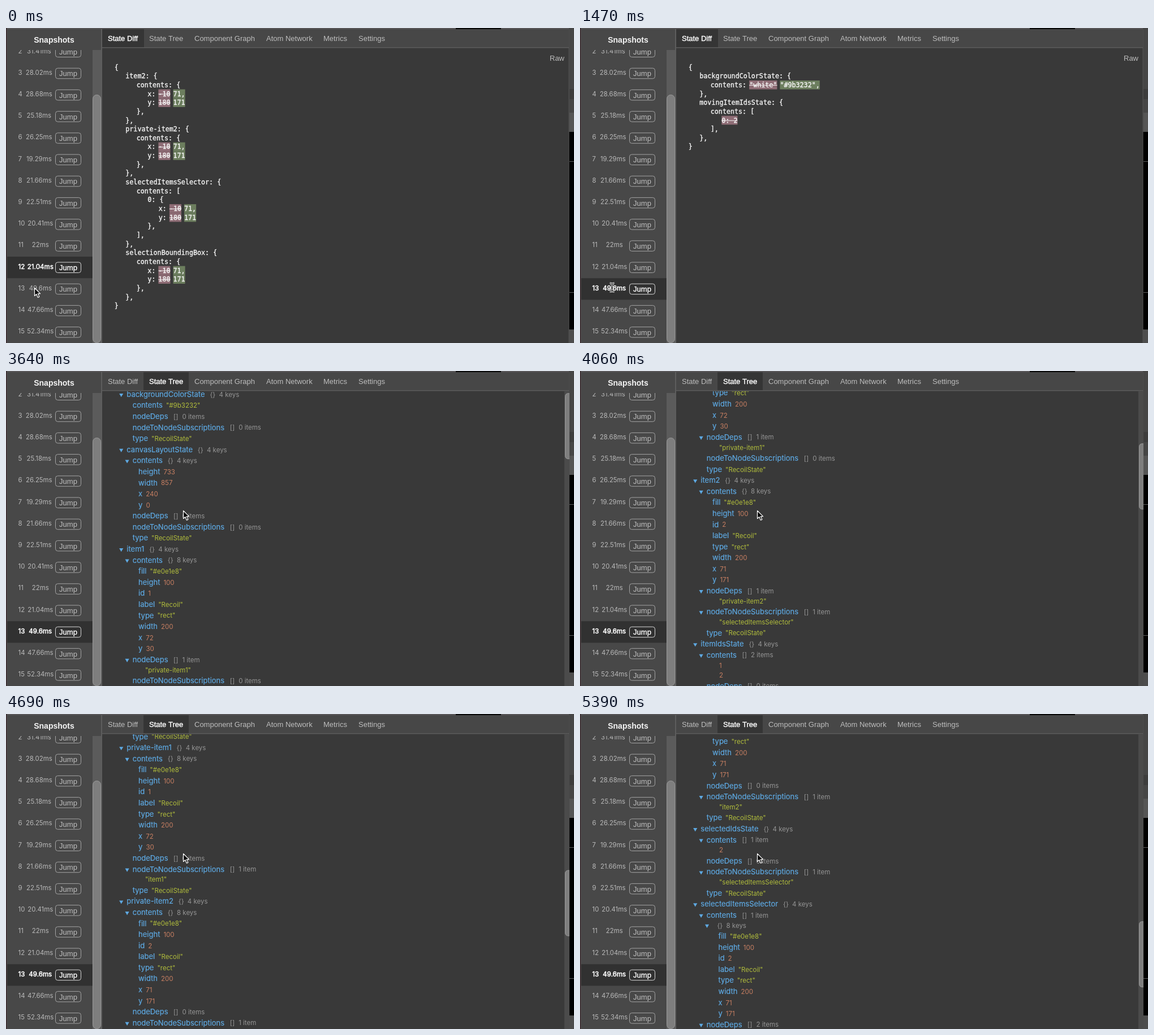
An HTML page with a canvas for the animation above (5460 ms loop, 1004x558 px).

```html
<!DOCTYPE html>
<html lang="en">
<head>
<meta charset="utf-8">
<title>State inspector</title>
<style>
  html, body { margin: 0; width: 100%; height: 100%; overflow: hidden; background: #393939; }
  canvas { display: block; width: 1004px; height: 558px; }
</style>
</head>
<body>
<canvas id="stage"></canvas>
<script>
const W = 1004, H = 558, LOOP = 5460, STEP = 70;
const PICK = 1120, HOVER = 2590, OPEN = 2870;
const SANS = '"Liberation Sans", Arial, sans-serif';
const UI = 'Inter, "Open Sans", sans-serif';
const MONO = '"DejaVu Sans Mono", monospace';
const BLUE = '#5ea9e2', GREEN = '#b1bd3c', ORANGE = '#c77f62', DIM = '#959595';

const canvas = document.getElementById('stage');
const ctx = canvas.getContext('2d');
const ratio = window.devicePixelRatio || 1;
canvas.width = W * ratio;
canvas.height = H * ratio;
ctx.scale(ratio, ratio);

function rect(x, y, w, h, color) {
  ctx.fillStyle = color;
  ctx.fillRect(x, y, w, h);
}

function rounded(x, y, w, h, r, fill, line) {
  ctx.beginPath();
  ctx.roundRect(x, y, w, h, r);
  if (fill) { ctx.fillStyle = fill; ctx.fill(); }
  if (line) { ctx.strokeStyle = line; ctx.lineWidth = 1; ctx.stroke(); }
}

// weight thickens the letters without changing their widths
function text(str, x, y, font, color, { align = 'left', weight = 0 } = {}) {
  ctx.font = font;
  ctx.fillStyle = ctx.strokeStyle = color;
  ctx.textAlign = align;
  ctx.fillText(str, x, y);
  if (weight) {
    ctx.lineWidth = weight;
    ctx.lineJoin = 'round';
    ctx.strokeText(str, x, y);
  }
}

function clipped(x, y, w, h, draw) {
  ctx.save();
  ctx.beginPath();
  ctx.rect(x, y, w, h);
  ctx.clip();
  draw();
  ctx.restore();
}

/* ---------- sidebar ---------- */

const times = ['31.41', '28.02', '28.68', '25.18', '26.25', '19.29', '21.66',
  '22.51', '20.41', '22', '21.04', '49.6', '47.66', '52.34'];

function drawSidebar(active) {
  rect(2, 2, 168, H, '#484848');
  text('Snapshots', 85, 26.3, 'bold 14px ' + SANS, '#f4f4f4', { align: 'center' });
  clipped(2, 39, 166, H - 39, () => {
    times.forEach((time, i) => {
      const n = i + 2, c = 42 + 38.2 * i, on = n === active;
      if (on) rect(2, c - 19, 151, 38.2, '#313131');
      const font = (on ? '500 ' : '') + '11.4px ' + UI;
      const color = on ? '#ffffff' : '#b9b9b9';
      const weight = on ? 0.35 : 0;
      text(n, 21.5, c + 2.6, font, color, { weight });
      text(time + 'ms', n < 10 ? 58.3 : 60.8, c + 2.6, font, color, { align: 'center', weight });
      rounded(87.5, c - 9, 45, 18.5, 4, null, on ? '#d8d8d8' : '#a3a3a3');
      text('Jump', 110, c + 5.2, '13px ' + SANS, on ? '#ffffff' : '#c0c0c0', { align: 'center', weight });
    });
    rect(153, 39, 15, H, '#5b5b5b');
    rounded(153.5, 118.5, 14, 439, 7, '#7e7e7e', '#999999');
  });
  rect(168, 2, 2, H, '#5d5d5d');
}

/* ---------- tabs ---------- */

const tabs = [['State Diff', 180], ['State Tree', 253], ['Component Graph', 333],
  ['Atom Network', 460], ['Metrics', 561], ['Settings', 623]];

function drawTabs(active, dark) {
  rect(170, 2, 825, 33, '#474747');
  rect(dark ? 243 : 170, 2, dark ? 80 : 74, 33, '#353535');
  rect(170, 34, 825, 1.5, '#5c5c5c');
  tabs.forEach(([name, x], i) => {
    const on = i === active;
    text(name, x, 22.5, '13px ' + SANS, on ? '#ffffff' : '#bdbdbd', { weight: on ? 0.4 : 0 });
  });
}

/* ---------- diff view: [depth, text, removed, added] ---------- */

const point = d => [[d, 'x:', '-10', '71,'], [d, 'y:', '180', '171']];
const moved = key => [[1, key + ': {'], [2, 'contents: {'], ...point(3), [2, '},'], [1, '},']];

const moveDiff = [
  [0, '{'], ...moved('item2'), ...moved('private-item2'),
  [1, 'selectedItemsSelector: {'], [2, 'contents: ['], [3, '0: {'], ...point(4),
  [3, '},'], [2, '],'], [1, '},'],
  ...moved('selectionBoundingBox'), [0, '}']
];
const colorDiff = [
  [0, '{'], [1, 'backgroundColorState: {'], [2, 'contents:', '"white"', '"#9b3232",'], [1, '},'],
  [1, 'movingItemIdsState: {'], [2, 'contents: ['], [3, '', '0: 2'], [2, '],'], [1, '},'], [0, '}']
];

function drawDiff(lines) {
  const font = '11.7px ' + MONO, lh = 15.65, weight = 0.35;
  text('Raw', 961, 57.5, '13px ' + SANS, '#bdbdbd');
  lines.forEach(([depth, str, removed, added], i) => {
    let x = 191.8 + 19.5 * depth;
    const y = 73.6 + lh * i, top = y - 11.9;
    text(str, x, y, font, '#f6f6f6', { weight });
    if (str) x += ctx.measureText(str).width + 5;
    if (removed) {
      const w = ctx.measureText(removed).width;
      rect(x, top, w, lh, '#8e6c75');
      text(removed, x, y, font, '#f6f6f6', { weight });
      rect(x, y - 4, w, 1, '#f6f6f6');
      x += w + 5;
    }
    if (added) {
      rect(x, top, ctx.measureText(added).width, lh, '#6c7e5e');
      text(added, x, y, font, '#f6f6f6', { weight });
    }
  });
}

/* ---------- tree view ---------- */

const rows = [];
const add = (depth, key, value) => rows.push({ depth, key, value });
const count = (n, word) => n + ' ' + word + (n === 1 ? '' : 's');
const dict = (depth, key, n) => rows.push({ depth, key, mark: '{}', note: count(n, 'key'), open: true });
const list = (key, items = []) => {
  rows.push({ depth: 1, key, mark: '[]', note: count(items.length, 'item'), open: items.length > 0 });
  items.forEach(value => rows.push({ value, leaf: true }));
};
const links = (deps, subs, last = true) => {
  list('nodeDeps', deps);
  if (!last) return;
  list('nodeToNodeSubscriptions', subs);
  add(1, 'type', '"RecoilState"');
};
const shape = (depth, id) => {
  const item = { fill: '"#e0e1e8"', height: 100, id, label: '"Recoil"', type: '"rect"',
    width: 200, x: id === 1 ? 72 : 71, y: id === 1 ? 30 : 171 };
  for (const key in item) add(depth, key, item[key]);
};
const itemNode = (name, id, deps, subs) => {
  dict(0, name, 4);
  dict(1, 'contents', 8);
  shape(2, id);
  links(deps, subs);
};
const listNode = (name, items, subs) => {
  dict(0, name, 4);
  list('contents', items);
  links([], subs);
};

dict(0, 'backgroundColorState', 4);
add(1, 'contents', '"#9b3232"');
links();
dict(0, 'canvasLayoutState', 4);
dict(1, 'contents', 4);
Object.entries({ height: 733, width: 857, x: 240, y: 0 }).forEach(([k, v]) => add(2, k, v));
links();
itemNode('item1', 1, ['"private-item1"']);
itemNode('item2', 2, ['"private-item2"'], ['"selectedItemsSelector"']);
listNode('itemIdsState', [1, 2]);
listNode('movingItemIdsState', []);
itemNode('private-item1', 1, [], ['"item1"']);
itemNode('private-item2', 2, [], ['"item2"']);
listNode('selectedIdsState', [2], ['"selectedItemsSelector"']);
dict(0, 'selectedItemsSelector', 4);
rows.push({ depth: 1, key: 'contents', mark: '[]', note: '1 item', open: true });
rows.push({ depth: 2, mark: '{}', note: '8 keys', open: true, leaf: true });
shape(3, 2);
links(['"selectedIdsState"', '"item2"'], [], false);

function triangle(x, y) {
  ctx.fillStyle = BLUE;
  ctx.beginPath();
  ctx.moveTo(x - 3.6, y - 2.4);
  ctx.lineTo(x + 3.6, y - 2.4);
  ctx.lineTo(x, y + 3.8);
  ctx.fill();
}

function drawRow(row, y) {
  const small = '11.5px ' + UI;
  let x = 213.3 + 10.4 * (row.depth || 0);
  if (row.open) triangle(x - 9.6, y + 0.7);
  if (row.key) {
    text(row.key, x, y + 4.3, '13px ' + UI, BLUE, { weight: 0.2 });
    x += ctx.measureText(row.key).width;
  }
  if (row.mark) {
    if (!row.key) x = 233.5;
    text(row.mark, x + 13.8, y + 4, small, DIM, { align: 'center' });
    text(row.note, x + 25, y + 4, small, DIM);
  } else {
    text(row.value, row.leaf ? 246 : x + 6, y + 4.2, small,
      typeof row.value === 'number' ? ORANGE : GREEN);
  }
}

function drawTree(scroll) {
  clipped(170, 36, 826, H - 36, () => {
    let y = 55.6 - scroll;
    for (const row of rows) {
      if (y > 15 && y < H + 20) drawRow(row, row.leaf ? y - 1.6 : y);
      y += row.leaf ? 17.7 : 19.58;
    }
    rect(987, 36, 9, H, '#4b4b4b');
    rounded(988.5, 36.5 + scroll / 4.42, 12, 116, 5, '#7e7e7e', '#999999');
  });
}

/* ---------- motion ---------- */

// time, offset, speed
const scrollKeys = [[3500, 0, 0], [3640, 14, 0.5], [4480, 886.1, 0.9], [4970, 1260.4, 0.62], [5390, 1463.9, 0.36]];
// time, x, y
const cursorKeys = [[0, 50, 460], [490, 51, 460], [980, 56, 459], [1680, 57, 459], [1960, 140, 400],
  [2450, 262, 52], [2660, 276, 14], [2940, 276, 14], [3080, 286, 60], [3430, 313, 247], [LOOP, 313, 247]];

function span(keys, t) {
  let i = 0;
  while (i < keys.length - 2 && t >= keys[i + 1][0]) i++;
  const a = keys[i], b = keys[i + 1], d = b[0] - a[0];
  return { a, b, d, u: Math.min(1, Math.max(0, (t - a[0]) / d)) };
}

function scrollAt(t) {
  const { a, b, d, u } = span(scrollKeys, t), v = 1 - u;
  return (1 + 2 * u) * v * v * a[1] + u * v * v * d * a[2]
    + u * u * (3 - 2 * u) * b[1] - u * u * v * d * b[2];
}

function drawCursor(t) {
  const { a, b, u } = span(cursorKeys, t);
  const x = a[1] + (b[1] - a[1]) * u, y = a[2] + (b[2] - a[2]) * u;
  ctx.save();
  ctx.translate(x, y);
  ctx.lineJoin = 'round';
  if (t >= 980 && t < 1750) {
    const beam = new Path2D('M-4-7Q0-7 0-4Q0-7 4-7M0-4V5M-4 8Q0 8 0 5Q0 8 4 8M-2 1.5H2');
    ctx.strokeStyle = '#ffffff';
    ctx.lineWidth = 3;
    ctx.stroke(beam);
    ctx.strokeStyle = '#111111';
    ctx.lineWidth = 1.2;
    ctx.stroke(beam);
  } else {
    const arrow = new Path2D('M.5.5V14.5L3.8 11.5L6.3 17.2L8.8 16.1L6.3 10.6H10.6Z');
    ctx.fillStyle = '#0b0b0b';
    ctx.fill(arrow);
    ctx.strokeStyle = '#ffffff';
    ctx.lineWidth = 1.2;
    ctx.stroke(arrow);
  }
  ctx.restore();
}

function drawEdges() {
  rect(0, 0, W, 2, '#585658');
  rect(795, 0, 80, 2, '#060606');
  rect(0, 0, 1.5, H, '#33272a');
  rect(1.5, 2, 1, H, '#6a5a5e');
  rect(995, 0, 9, 184, '#464646');
  rect(996, 108, 8, 18, '#3d3d3d');
  rect(996, 150, 8, 34, '#555555');
  rect(995, 184, 9, 350, '#000000');
  rect(996, 236, 8, 1, '#5a5a5a');
  rect(996, 468, 8, 1, '#5a5a5a');
  rect(995, 534, 9, 24, '#4d4d4d');
  rect(994.5, 2, 1, H, '#555555');
}

function draw(t) {
  const tree = t >= OPEN;
  rect(0, 0, W, H, '#393939');
  drawEdges();
  drawSidebar(t < PICK ? 12 : 13);
  drawTabs(tree ? 1 : 0, t >= HOVER);
  if (tree) drawTree(scrollAt(t));
  else drawDiff(t < PICK ? moveDiff : colorDiff);
  drawCursor(t);
}

const start = performance.now();
function tick() {
  const t = (performance.now() - start) % LOOP;
  draw(Math.floor(t / STEP) * STEP);
  requestAnimationFrame(tick);
}
tick();
</script>
</body>
</html>
```
